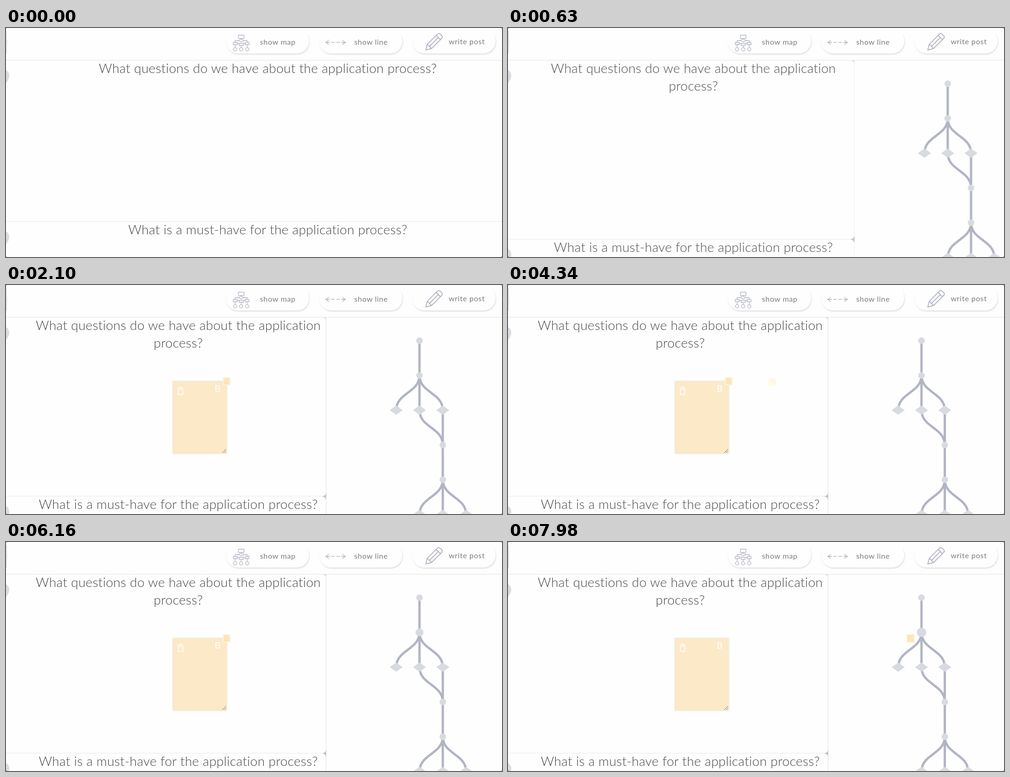
These frames come from a looping animation (1064x494 px, 8.05 s). An HTML page:

```html
<!DOCTYPE html>
<html lang="en">
<head>
<meta charset="utf-8">
<title>Question board</title>
<style>
  html, body { margin: 0; width: 100%; height: 100%; overflow: hidden; background: #fefefe; }
  svg { display: block; width: 1064px; height: 494px; }
  text { font-family: Lato, "Open Sans", sans-serif; text-anchor: middle; }

  .title { font-size: 28px; font-weight: 300; letter-spacing: .27px; fill: #48484b; }
  .label { font-size: 16px; font-weight: 400; letter-spacing: .65px; fill: #7c7c80; }
  .icon { fill: none; stroke: #b4b6c3; stroke-width: 1.3; }
  .bold { stroke-width: 2; stroke-linejoin: round; }
  .button { fill: #fefefe; filter: drop-shadow(1.5px 2px 1.5px rgba(0, 0, 0, .13)); }
  .rule { fill: none; stroke: #e3e3e5; }
  .links { fill: none; stroke: #b1b4c3; stroke-width: 5; }
  .nodes { fill: #d8dae2; }
  .paper { fill: #fce9c8; filter: drop-shadow(0 0 1.5px rgba(150, 140, 110, .35)); }
  .mini { fill: #fce5bb; stroke: #fdf3dc; stroke-width: 2; }

  /* One loop is 8050 ms; every animation shares it. */
  .side, .center, .wrap, .single, .double, .note, .handle, .placed, .ghost, .target {
    animation: 8050ms infinite both;
  }
  .side { animation-name: side; }
  .center { animation-name: center; }
  .wrap { animation-name: wrap; animation-timing-function: step-end; }
  .single { animation-name: single; animation-timing-function: step-end; }
  .double { animation-name: double; animation-timing-function: step-end; }
  .note { animation-name: note; animation-timing-function: step-end; }
  .handle { animation-name: handle; animation-timing-function: step-end; }
  .placed { animation-name: placed; animation-timing-function: step-end; }
  .ghost { animation-name: drag, carried; animation-timing-function: linear, step-end; }
  .target { animation-name: swell; transform-origin: 887px 195px; }

  /* The map panel is 384px wide; centred titles travel half as far. */
  @keyframes side {
    0%, 5.14% { transform: translateX(384px); animation-timing-function: ease; }
    9.985%, 100% { transform: none; }
  }
  @keyframes center {
    0%, 5.14% { transform: translateX(192px); animation-timing-function: ease; }
    9.985%, 100% { transform: none; }
  }
  @keyframes wrap { 0% { transform: translateY(-38px); } 7.205%, 100% { transform: none; } }
  @keyframes single { 0% { opacity: 1; } 7.205%, 100% { opacity: 0; } }
  @keyframes double { 0% { opacity: 0; } 7.205%, 100% { opacity: 1; } }
  @keyframes note { 0% { opacity: 0; } 26.087%, 100% { opacity: 1; } }
  @keyframes handle { 0% { opacity: 1; } 82.609%, 100% { opacity: 0; } }
  @keyframes placed { 0% { opacity: 0; } 84.348%, 100% { opacity: 1; } }
  @keyframes carried { 0% { opacity: 0; } 53.913% { opacity: 1; } 73.913%, 100% { opacity: 0; } }
  @keyframes drag {
    0%, 53.913% { transform: translate(566px, 210px); }
    60%, 63.478% { transform: translate(850px, 183px); }
    70.435%, 100% { transform: translate(882px, 206px); }
  }
  @keyframes swell {
    0%, 73.168% { transform: scale(1); animation-timing-function: cubic-bezier(.65, 0, .35, 1); }
    82.484%, 94.037% { transform: scale(2.143); animation-timing-function: cubic-bezier(.32, 0, .67, 0); }
    98.696% { transform: scale(1.571); animation-timing-function: linear; }
    100% { transform: scale(1.2); }
  }
</style>
</head>
<body>
<svg viewBox="0 0 1064 494" xmlns="http://www.w3.org/2000/svg">
  <defs>
    <path id="pin" fill="#dadce4" fill-rule="evenodd"
      d="M-7-14a14 14 0 0 0-14 14c0 10 14 25 14 25s14-15 14-25a14 14 0 0 0-14-14zm0 4a7.500 7.500 0 1 1 0 15a7.500 7.500 0 1 1 0-15z"/>
    <path id="diamond" d="M-14 0L0-10L14 0L0 10z"/>
    <circle id="dot" r="7"/>
    <!-- a fork from a dot to three diamonds 75px below -->
    <path id="fork" d="M0 0V75M0 0C0 37.5-50 37.5-50 75M0 0C0 37.5 50 37.5 50 75"/>
    <g id="trio">
      <use href="#diamond" x="-50"/><use href="#diamond"/><use href="#diamond" x="50"/>
    </g>
  </defs>

  <rect width="1064" height="494" fill="#fefefe"/>

  <!-- panel edge and map -->
  <g class="side">
    <path d="M679 70H686.500V77Q686 71 679 70z" fill="#dcdce0"/>
    <path class="rule" d="M686.500 70V494"/>
    <g class="wrap">
      <path class="rule" stroke-opacity=".8" d="M-400 455.500H687"/>
      <path d="M687 447Q686 455 678 456Q686 457 687 465z" fill="#c3c3c8"/>
    </g>
    <g class="links">
      <path d="M887 120V195M887 270C887 307.500 937 307.500 937 345M937 270V420"/>
      <use href="#fork" x="887" y="195"/>
      <use href="#fork" x="937" y="420"/>
    </g>
    <g class="nodes">
      <use href="#dot" x="887" y="120"/>
      <circle class="target" cx="887" cy="195" r="7"/>
      <use href="#trio" x="887" y="270"/>
      <use href="#dot" x="937" y="345"/>
      <use href="#dot" x="937" y="420"/>
      <use href="#trio" x="937" y="495"/>
    </g>
  </g>

  <!-- questions -->
  <use href="#pin" y="103"/>
  <g class="center title">
    <text class="single" x="369.500" y="97">What questions do we have about the application process?</text>
    <g class="double">
      <text x="369.500" y="97">What questions do we have about the application</text>
      <text x="369.500" y="135">process?</text>
    </g>
  </g>
  <g class="wrap">
    <use href="#pin" y="489"/>
    <g class="center title">
      <text x="369.500" y="483">What is a must-have for the application process?</text>
    </g>
  </g>

  <!-- sticky note -->
  <g class="note">
    <rect class="paper" x="358" y="207.500" width="115.500" height="156"/>
    <g fill="none" stroke="#fff" stroke-width="1.600">
      <path d="M368 222.500H381M372 220H377.500M369.800 225.500H379.500V236H369.800z"/>
    </g>
    <text x="454" y="230" font-size="20" fill="#fff">B</text>
    <path d="M464 362L472 354M468.500 362L472 358.500" stroke="#6d675c" fill="none"/>
    <rect class="mini handle" x="466" y="200" width="14.500" height="15.500"/>
  </g>
  <g class="ghost">
    <rect x="-7" y="-8" width="15" height="15" fill="#fff9df"/>
    <rect x="-7" y="-2" width="8" height="9" fill="#fffdf2" stroke="#fff6d2"/>
  </g>
  <rect class="mini placed" x="856" y="199.500" width="15.500" height="17"/>

  <!-- toolbar -->
  <rect width="1064" height="69" fill="#fefefe"/>
  <path class="rule" stroke="#dedee0" d="M0 69.500H1064"/>
  <rect class="button" x="-180" y="2" width="181" height="53" rx="26"/>
  <path d="M1 6V55" stroke="#e4e4e6" stroke-width="2"/>
  <rect class="button" x="472" y="2" width="178" height="53" rx="26"/>
  <rect class="button" x="672" y="2" width="178" height="53" rx="26"/>
  <rect class="button" x="872" y="2" width="178" height="53" rx="26"/>
  <rect x="470" width="594" height="14" fill="#fefefe"/>

  <g class="icon">
    <path d="M498.500 15.500H510.500V22.500H498.500zM504.500 22.500V24M504.500 24L511 27L504.500 30L498 27z"/>
    <path d="M498 27H491.500V31M511 27H517.500V31"/>
    <path d="M487.500 31H496V36H487.500zM500 33H509V37.500H500zM513 31H521.500V36H513z"/>
    <path d="M491.500 36V42M504.500 37.500V42M517.500 36V42M496 33.500H500M509 33.500H513"/>
    <circle cx="491.500" cy="46" r="3.700"/>
    <circle cx="504.500" cy="46" r="3.700"/>
    <circle cx="517.500" cy="46" r="3.700"/>
  </g>
  <g class="icon">
    <path d="M686 31H695M698 31H705M709 31H716M719 31H728"/>
    <path d="M692 25.500Q690 30 685 31Q690 32 692 36.500M722 25.500Q724 30 729 31Q724 32 722 36.500"/>
  </g>
  <g class="icon bold" transform="translate(900.500 47.500) rotate(-45)">
    <path d="M0 0L11-6.500H41Q46-6.500 46-2V2Q46 6.500 41 6.500H11zM11-6.500V6.500M38-6.500V6.500M11 0H38"/>
  </g>

  <g class="label">
    <text x="583" y="35.500">show map</text>
    <text x="783" y="35.500">show line</text>
    <text x="988.500" y="34.500">write post</text>
  </g>

  <!-- window corners -->
  <path d="M0 0H2L0 2zM1064 0V2L1062 0zM0 494V492L2 494zM1064 494H1062L1064 492z" fill="#77777b"/>
</svg>
</body>
</html>
```
